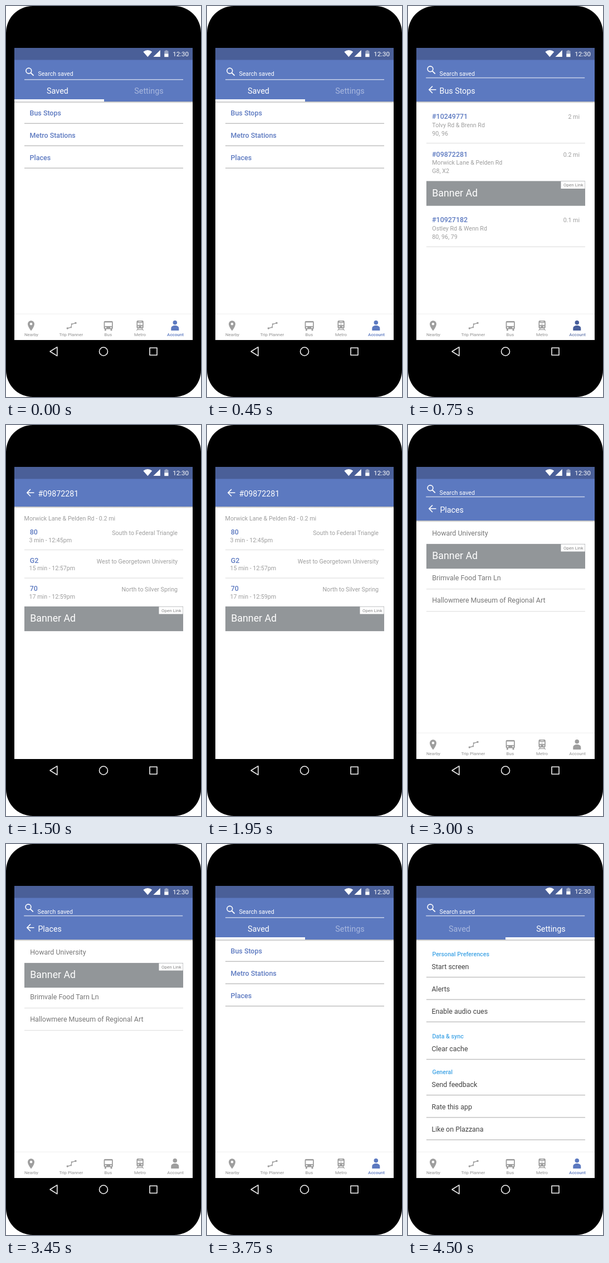
These frames come from a looping animation (350x700 px, 5250 ms). An HTML page:

```html
<!DOCTYPE html>
<html lang="en">
<head>
<meta charset="utf-8">
<title>Transit app walkthrough</title>
<style>
html, body { margin: 0; width: 100%; height: 100%; overflow: hidden; background: #fff; }
svg { display: block; width: 350px; height: 700px; font-family: Roboto, sans-serif; }
</style>
</head>
<body>
<svg viewBox="0 0 350 700">
  <defs>
    <linearGradient id="shade" x1="0" y1="0" x2="0" y2="1">
      <stop offset="0" stop-color="#000" stop-opacity=".3"/>
      <stop offset="1" stop-color="#000" stop-opacity="0"/>
    </linearGradient>
  </defs>
  <rect width="350" height="700" rx="48"/>
  <rect x="15" y="75" width="320" height="523" fill="#fff"/>
  <g id="screen"></g>
  <g fill="none" stroke="#f2f2f2" stroke-width="1.6" stroke-linejoin="round">
    <path d="M91.8 610.6V626.4L79 618.5Z"/>
    <circle cx="175" cy="618.5" r="7.5"/>
    <rect x="258" y="612" width="13" height="13"/>
  </g>
</svg>
<script>
const BLUE = '#5c79c0', NAVY = '#475e9b', GRAY = '#9e9e9e', SKY = '#42a5e6';
const BIG = 14.22, MID = 12.44, SMALL = 10.67;
const HOLD = 750;

const text = (x, y, str, size, fill, weight = 400, anchor = 'start') =>
  `<text x="${x}" y="${y}" font-size="${size}" fill="${fill}" font-weight="${weight}" text-anchor="${anchor}">${str.replace(/&/g, '&amp;')}</text>`;
const rect = (x, y, w, h, fill, extra = '') =>
  `<rect x="${x}" y="${y}" width="${w}" height="${h}" fill="${fill}" ${extra}/>`;
const dot = (x, y, r, fill) => `<circle cx="${x}" cy="${y}" r="${r}" fill="${fill}"/>`;
const path = (d, extra) => `<path d="${d}" ${extra}/>`;
const move = (x, y, body) => `<g transform="translate(${x} ${y})">${body}</g>`;

const rule = (y, fill = '#c2c2c2') => rect(33, y - .7, 285, 1.5, fill);
const faint = y => rule(y, '#e6e6e6');
const title = (x, y, str) => text(x, y, str, MID, BLUE, 500);
const note = (x, y, str) => text(x, y, str, SMALL, GRAY);
const side = (y, str) => text(308, y, str, SMALL, GRAY, 400, 'end');

function statusBar(dy) {
  return rect(15, 75, 320, 21.5, '#4a5f98') + move(0, dy,
    path('M246.3 82Q254.3 75.8 262.3 82L254.3 91.2Z', 'fill="#fff"') +
    path('M276.8 79V91H264.4Z', 'fill="#fff"') +
    path('M284.3 85.4V80.6H286.2V79.3H289.6V80.6H291.5V85.4Z', 'fill="#fff" opacity=".45"') +
    rect(284.3, 85.4, 7.2, 5.8, '#fff') +
    text(299.3, 89.6, '12:30', 11.55, '#fff'));
}

const header = bottom =>
  rect(15, 96, 320, bottom - 96, BLUE) + rect(15, bottom, 320, 3, 'url(#shade)');

function search(dx, dy) {
  return move(dx, dy,
    '<circle cx="40.8" cy="116" r="4.9" fill="none" stroke="#fff" stroke-width="1.6"/>' +
    path('M44.4 119.6L49.6 124.6', 'stroke="#fff" stroke-width="1.9"') +
    rect(33, 131, 285, 1.5, '#fff', 'opacity=".65"')) +
    text(57.4 + dx, 124.8, 'Search saved', SMALL, '#fff');
}

const arrow = y => path(`M50.5 ${y}H38M44 ${y - 6.2}L37.8 ${y}L44 ${y + 6.2}`,
  'fill="none" stroke="#fff" stroke-width="1.6"');

const tabs = right =>
  text(92.5, 157, 'Saved', 14.4, right ? '#a9b8de' : '#fff', 400, 'middle') +
  text(256.5, 157, 'Settings', 14.4, right ? '#fff' : '#a9b8de', 400, 'middle') +
  rect(right ? 175 : 15, 167, right ? 160 : 161, 4.2, '#fff');

const back = (x, str) => search(-.8, -3.2) + arrow(149.8) + text(x, 157, str, BIG, '#fff');

function banner(y) {
  return rect(33, y, 285, 44.3, '#929699') +
    text(43.3, y + 27.5, 'Banner Ad', 17.78, '#fff') +
    rect(274.5, y + .6, 43, 13, '#fff') +
    text(296.8, y + 9.8, 'Open Link', 8, '#858585', 400, 'middle');
}

function navIcons(tint) {
  const stroke = `fill="none" stroke="${GRAY}"`;
  const pin = path('M45 581.5C41.5 577 39 573 39 569.3A6 6 0 0 1 51 569.3C51 573 48.5 577 45 581.5Z', `fill="${GRAY}"`) +
    dot(45, 569.3, 2.2, '#fff');
  const trip = path('M110.3 577L116.8 575.3L118 569.5L125 567.5', stroke + ' stroke-width="1.4"') +
    dot(110.3, 577, 1.7, GRAY) + dot(116.8, 575.3, 1.3, GRAY) +
    dot(118, 569.5, 1.3, GRAY) + dot(125, 567.5, 1.7, GRAY);
  const bus = rect(175.6, 564, 16.2, 14.6, GRAY, 'rx="2"') +
    rect(177.4, 566.6, 12.6, 6.4, '#fff') +
    rect(177, 578, 2.8, 3.4, GRAY) + rect(187.6, 578, 2.8, 3.4, GRAY) +
    dot(179, 575.8, 1.2, '#fff') + dot(188.4, 575.8, 1.2, '#fff');
  const metro = rect(234.4, 563, 12.4, 14.2, GRAY, 'rx="2.5"') +
    rect(236.2, 567, 4, 4.2, '#fff') + rect(241, 567, 4, 4.2, '#fff') +
    rect(237.6, 564.4, 6, 1, '#fff') +
    dot(237.6, 574.2, 1.1, '#fff') + dot(243.6, 574.2, 1.1, '#fff') +
    path('M237.4 577L234.4 581M243.8 577L246.8 581M236 579.4H245.2', stroke + ' stroke-width="1.2"');
  const person = dot(303.3, 566.8, 3.8, tint) +
    path('M296.3 581V577.2C296.3 573.6 299.5 572 303.3 572S310.3 573.6 310.3 577.2V581Z', `fill="${tint}"`);
  return pin + trip + bus + metro + person;
}

function nav(tint = GRAY, weight = 400, dy = 0) {
  const labels = [['Nearby', 45.5], ['Trip Planner', 116.8], ['Bus', 183.3], ['Metro', 240.6]];
  return rect(15, 550.6, 320, 1.4, '#f3f3f3') + navIcons(tint) +
    labels.map(([s, x]) => text(x, 590.6 + dy, s, 8, '#8f8f8f', 400, 'middle')).join('') +
    text(304, 590.6 + dy / 2, 'Account', 8, tint === GRAY ? '#8f8f8f' : tint, weight, 'middle');
}

const page = (bottom, body, dy = 0) => header(bottom) + statusBar(dy) + body;

function saved() {
  const rows = ['Bus Stops', 'Metro Stations', 'Places'];
  return page(171, search(0, 0) + tabs(false) +
    rows.map((s, i) => title(42.6, 196 + 40 * i, s) + rule(210.2 + 40 * i)).join('') +
    nav(BLUE, 500));
}

const stop = (y, id, street, lines, miles) =>
  title(43, y, id) + note(43.3, y + 14.2, street) + note(43.3, y + 29.3, lines) + side(y, miles);

const stops = () => page(171, back(56.6, 'Bus Stops') +
  stop(202.3, '#10249771', 'Tolvy Rd & Brenn Rd', '90, 96', '2 mi') + faint(245.5) +
  stop(269.9, '#09872281', 'Morwick Lane & Pelden Rd', 'G8, X2', '0.2 mi') + banner(313.4) +
  stop(387.3, '#10927182', 'Ostley Rd & Wenn Rd', '80, 96, 79', '0.1 mi') + faint(431) +
  nav(NAVY));

const ride = (y, line, due, way) =>
  title(42.8, y, line) + note(41.6, y + 13.6, due) + side(y + 1, way);

const departures = () => page(146, arrow(121.3) +
  text(57.6, 128.2, '#09872281', BIG, '#fff') +
  note(32.6, 171, 'Morwick Lane & Pelden Rd - 0.2 mi') +
  ride(195.9, '80', '3 min - 12:45pm', 'South to Federal Triangle') + faint(223.4) +
  ride(246.8, 'G2', '15 min - 12:57pm', 'West to Georgetown University') + faint(274) +
  ride(297.4, '70', '17 min - 12:59pm', 'North to Silver Spring') + banner(324.8));

const lineDots = (y, colors) => colors.map((c, i) => dot(47.6 + 14 * i, y, 4, c)).join('');

function stations() {
  const green = '#0da94c', yellow = '#fad60a', red = '#e2242b', blue = '#0f76c6';
  return page(171, back(58.4, 'Metro Stations') +
    title(42.6, 202.3, 'Shaw/Howard University') + note(43.3, 216.4, 'Corlin Rd & Yand Rd') +
    side(202.3, '2 mi') + lineDots(228.5, [green, yellow]) + faint(245.5) +
    title(42.6, 269.8, 'Chinatown/Gallery Place') + note(43.3, 284, 'Velmora Road & Tansley Ln') +
    side(269.9, '0.2 mi') + lineDots(294.2, [green, yellow, red, blue]) +
    banner(313.4) + nav());
}

function places() {
  const row = (y, s) => text(43.2, y, s, MID, '#777');
  return page(171, back(57.4, 'Places') +
    row(197.6, 'Howard University') + banner(212.9) +
    row(277.8, 'Brimvale Food Tarn Ln') + faint(293.6) +
    row(317.8, 'Hallowmere Museum of Regional Art') + faint(333.6) + nav());
}

function settings() {
  const group = (y, name, items) => text(43.4, y, name, SMALL, SKY, 500) +
    items.map((s, i) => text(42.5, y + 23.4 + 40 * i, s, MID, '#424242') + rule(y + 37.8 + 40 * i)).join('');
  return page(171, search(-.8, -3.2) + tabs(true) +
    group(200.6, 'Personal Preferences', ['Start screen', 'Alerts', 'Enable audio cues']) +
    group(347.7, 'Data & sync', ['Clear cache']) +
    group(411.7, 'General', ['Send feedback', 'Rate this app', 'Like on Plazzana']) +
    nav(BLUE, 500, .7), -.8);
}

const steps = [saved, stops, departures, stations, places, saved, settings];
const screen = document.getElementById('screen');
const start = performance.now();
let shown = -1;

function draw(now) {
  const step = Math.floor(Math.max(0, now - start) / HOLD) % steps.length;
  if (step !== shown) {
    screen.innerHTML = steps[step]();
    shown = step;
  }
}

function tick(now) {
  draw(now);
  requestAnimationFrame(tick);
}

draw(start);
requestAnimationFrame(tick);
</script>
</body>
</html>
```
